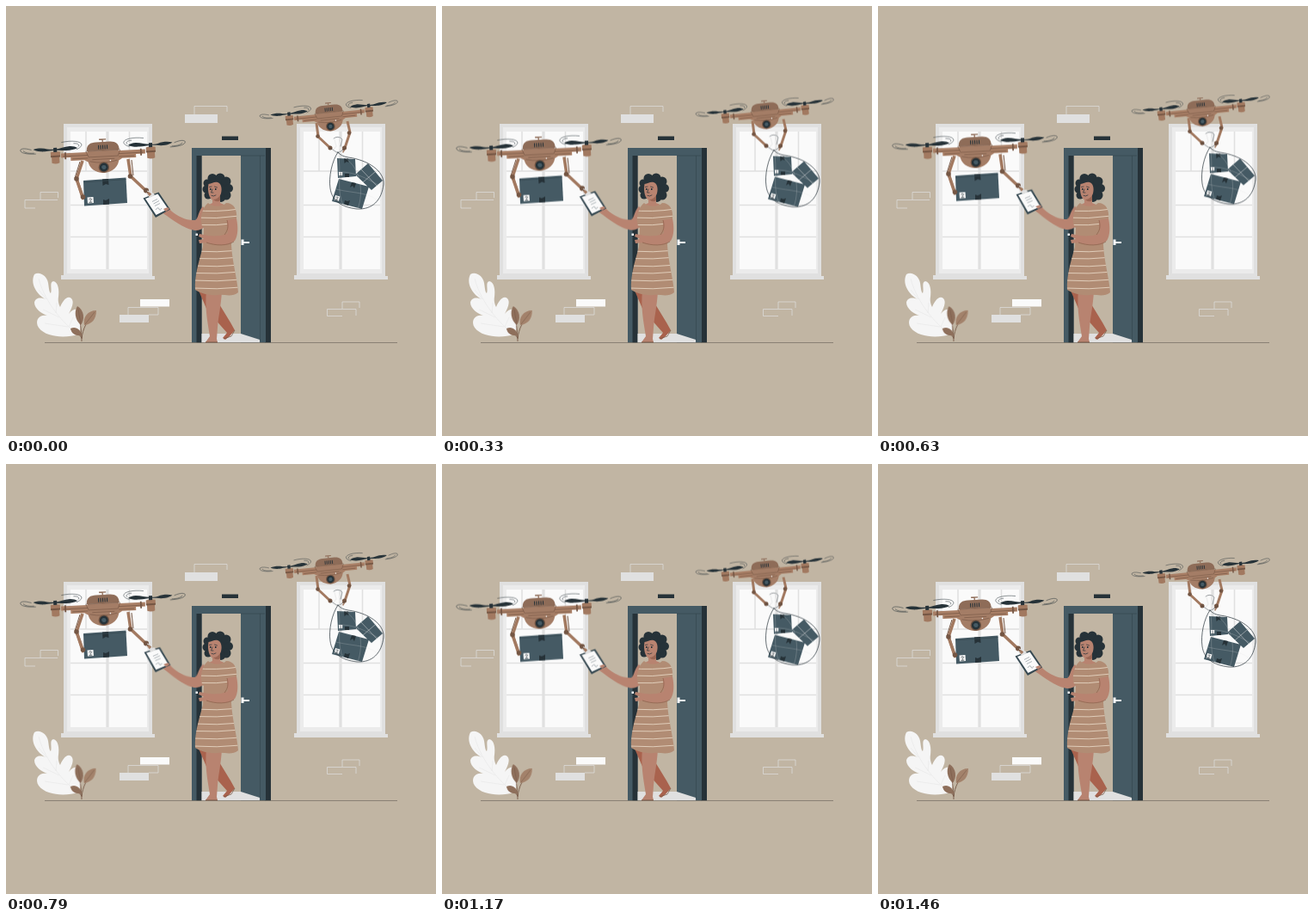
Write an HTML page that moves like this. It is 500 px wide and 500 px high and loops after 1.5 s.

```html
<!DOCTYPE html>
<html lang="en">
<head>
<meta charset="utf-8">
<title>Drone delivery</title>
<style>
html, body { margin: 0; width: 100%; height: 100%; overflow: hidden; background: #c1b5a3; }
svg { display: block; width: 100vw; height: 100vh; }
.bob, .arm, .sway { animation: bob 750ms cubic-bezier(.37, 0, .63, 1) infinite alternate; }
.arm { animation-name: lift; transform-origin: 236px 240px; }
.sway { animation-name: sway; transform-origin: 88px 390px; }
@keyframes bob { to { transform: translateY(-6px); } }
@keyframes lift { to { transform: rotate(3.5deg); } }
@keyframes sway { to { transform: rotate(-.7deg); } }
.dark { fill: #263238; }
.slate { fill: #455a64; }
.pale { fill: #e0e0e0; }
.white { fill: #fafafa; }
.skin { fill: #b88370; }
.line { fill: none; stroke: #e0e0e0; }
.ink { fill: none; stroke: #263238; stroke-linecap: round; }
.limb { fill: none; stroke: #a27960; stroke-linejoin: round; }
.shade { fill: none; stroke: #745644; }
.joint { fill: #745644; }
</style>
</head>
<body>
<svg viewBox="0 0 500 500" stroke-width=".7">
<defs>
  <g id="window">
    <path class="pale" d="M0 0H103V177H106V181H-3V176H0Z"/>
    <path fill="#ebebeb" d="M4 4H99V174H4Z"/>
    <path class="white" d="M8 9H97V169H8Z"/>
    <path d="M51 9V169" stroke="#e0e0e0" stroke-width="3.2"/>
    <path d="M26 9V55M76.500 9V55M8 55H97M8 94.500H97M8 131.500H97" stroke="#e0e0e0" stroke-width="1.5"/>
  </g>

  <g id="rotor">
    <path d="M-5.500 0Q0 -1.500 5.500 0V5H4.500V12.500Q0 14.500 -4.500 12.500V5H-5.500Z" fill="#a27960"/>
    <path class="joint" d="M-5.500 4H5.500V6H-5.500Z"/>
    <path class="dark" d="M0 -2.200C-8 -2 -12 -.8 -17 -1.500C-21 -2 -24 -3 -25.500 -4.300C-20 -5.800 -14 -5.500 -9 -4C-5 -3 -2 -3.300 0 -3.300C5 -3.400 11 -5.800 17 -6C21 -6 24 -5 26 -3.500C23 -2 18 -1 13 -1.200C8 -1.500 4 -2.200 0 -2.200Z"/>
    <path class="dark" d="M-2 -5H2V0H-2Z"/>
    <path class="ink" stroke-width=".5" d="M-23 1C-36 1 -42 -2 -40 -5C-37 -7 -31 -5 -28 -4M-37 -3C-34 0 -29 0 -25 0M8 -11C20 -13 31 -11 31 -7C31 -5 28 -3 25 -2M22 -9C28 -9 29 -6 27 -5"/>
  </g>

  <g id="drone">
    <use href="#rotor" transform="translate(-55.500 -5)"/>
    <use href="#rotor" transform="matrix(-1 0 0 1 55.500 -5)"/>
    <path d="M-49 -3H49V2H38V6H22L17 9H-17L-22 6H-38V2H-49Z" fill="#a97f66"/>
    <path class="shade" d="M-47 .5H47M-36 4H36"/>
    <path class="shade" d="M-44 -4V4M44 -4V4" stroke-width="1.8"/>
    <path d="M-19 -4C-19 -12 -14 -14 -8 -14H8C15 -14 19 -11 19 -4Z" fill="#8e6c58"/>
    <path d="M-18 -4H18V6C18 16 9 22 0 22C-9 22 -18 16 -18 6Z" fill="#a47d66"/>
    <path class="shade" d="M-20 -4H20L17 3H-17ZM-13 6H13M-16 8Q0 12 16 8" stroke-width=".6"/>
    <path class="ink" d="M-5 -10V-6M-2.500 -10V-6M0 -10V-6M2.500 -10V-6M5 -10V-6" stroke-width="1"/>
    <path d="M0 -14V-17M-4 -17H4" stroke="#8e6c58" stroke-width="1.3"/>
    <circle class="joint" cy="15.500" r="6.300"/>
    <circle class="dark" cy="15.500" r="5"/>
    <circle class="slate" cy="15.500" r="2.600"/>
    <circle class="white" cx="8" cy="8" r=".8"/>
  </g>

  <g id="label">
    <path class="white" d="M0 0H7V7H0Z"/>
    <path class="ink" d="M2 2.500L3.500 1.500L5 2.500L3.500 4V5M2 6H5"/>
  </g>
</defs>

<rect width="500" height="500" fill="#c1b5a3"/>

<path class="pale" d="M208 126H246V136H208ZM132 359H166V368H132Z"/>
<path class="white" d="M156 341H190V349.500H156Z"/>
<path class="line" d="M219 126V116.500H257V123M40 225V216.500H60.500V223M34 235H22V225.500H60M142 359V350.500H177V359H166M391 352V344H411V351M391 360.500H373.500V352.500H407V360"/>
<use href="#window" x="67" y="137"/>
<use href="#window" x="338" y="137"/>

<!-- Doorway -->
<path class="dark" d="M251 151.500H270V156H251ZM301 165H308V391.500H301Z"/>
<path class="slate" d="M216 165H302V391.500H273V174H227.500V391.500H216Z"/>
<path class="dark" d="M221.500 174H227.500V391.500H221.500Z"/>
<path class="pale" d="M227.500 381H273L295 388V391.500H227.500Z"/>
<path d="M295.500 174V389M273 174H301" fill="none" stroke="#344750"/>
<path class="white" d="M273.500 271.500H276.500V278H273.500ZM276 274H283V276H276ZM220.500 264.500H223V267H220.500Z"/>
<path d="M45 391.500H455" stroke="#716b60"/>

<!-- Plants -->
<path fill="#f5f5f5" d="M33 312C39 308 48 314 49 322C50 328 50 332 52 334C54 330 50 321 55 320C61 321 62 331 61 338C60 344 62 348 63 350C66 343 71 336 76 340C80 344 76 352 73 358C77 352 84 350 86 356C89 364 87 376 84 382C70 386 47 386 38 374C33 366 38 358 48 360C42 358 33 352 33 345C34 338 42 339 46 341C38 337 27 324 33 312Z"/>
<path d="M38 317C44 340 61 364 83 382M58 357L59 345M47 341L38 330M62 362L43 353M72 373L45 369M73 373L78 362" fill="none" stroke="#e8e8e8"/>
<g class="sway">
  <path class="shade" d="M88 390C88 381 87 372 84 356M88 387C89 375 95 365 103 356M88 386Q84 379 77 378" stroke-width=".9"/>
  <path fill="#8e6f5b" d="M83 349C79 355 80 365 87 371C92 364 91 354 83 349Z"/>
  <path fill="#a3826b" d="M105 354C95 354 89 362 91 371C100 370 105 364 105 354Z"/>
  <path fill="#8e6f5b" d="M75 375C81 372 87 376 88 383C81 384 76 381 75 375Z"/>
  <path class="shade" d="M84 353L87 370M103 356L92 370" stroke-width=".5"/>
</g>

<!-- Woman -->
<path fill="#a9624d" d="M224 331L239 332L261 368L266 377L260 384L255 388L252 386L257 380L234 354Z"/>
<path class="shade" d="M253 387L262 384L266 377"/>
<path class="skin" d="M233 331H251C250 350 247 360 246 374L245 387L246 391H232L237 384C234 365 231 350 233 331Z"/>
<path class="shade" d="M232 391H246" stroke-width="1"/>
<g class="dark">
  <ellipse cx="247" cy="211" rx="13" ry="14"/>
  <circle cx="240" cy="200.500" r="5.500"/>
  <circle cx="249" cy="200" r="5.500"/>
  <circle cx="256" cy="204" r="5.500"/>
  <circle cx="259" cy="212" r="5"/>
  <circle cx="256" cy="220" r="5.500"/>
  <circle cx="250" cy="223" r="5"/>
  <circle cx="234" cy="206" r="4.500"/>
  <circle cx="233" cy="213" r="4.500"/>
  <circle cx="235" cy="220" r="4.500"/>
</g>
<g class="arm">
  <path class="skin" d="M229 233C223 239 224 247 220 249C210 250 199 244 193 239L187 233L182 235L181 240L187 244C199 253 211 260 220 261C230 261 235 254 237 243Z"/>
  <path fill="#344750" d="M159.500 223.500L177.500 216.500L191 236.500L174 246Z"/>
  <path class="white" d="M162 224L176.500 218.500L188.500 236L174.500 243Z"/>
  <path d="M170 227.500L176 224.500M171.500 230L178 226.500M173 232.500L179 229.500M174 237Q177 233 178 236T181 235" fill="none" stroke="#8a949a"/>
  <path class="pale" d="M165 219.500L171 217L173 220L167 223Z"/>
  <path class="skin" d="M183 236L188 234L190 236L186 239Z"/>
</g>
<path class="skin" d="M240 217H249V229L256 232C250 238 241 237 236 231L240 229Z"/>
<path class="skin" d="M235.500 207C240 206 244 203 248 206C251 209 251 214 250 218C248 223 245 226 241.500 226C236 225 234 215 235.500 207Z"/>
<path d="M241 225Q246 225 249 220V226Q245 229 241 225Z" fill="#9a6654"/>
<path class="ink" d="M236.500 210.500L239 210M242.500 210L245.500 211M240 213L238.500 217H241M239 220.500Q241 222 244 220"/>
<path class="dark" d="M237 212H238.500V214H237ZM243 212H244.500V214H243Z"/>
<path fill="#b18c74" id="dress" d="M235 229C240 234 251 234 256 229C265 229 269 237 268 247C266 258 262 265 262 278C263 297 269 318 270 333C263 339 254 335 246 336C237 337 226 334 220 330C219 314 224 298 229 280L230 258C224 253 227 235 235 229Z"/>
<clipPath id="cut"><use href="#dress"/></clipPath>
<path clip-path="url(#cut)" d="M218 237.500Q245 240 271 236M218 246Q245 248 271 244M218 254.500Q245 256 271 252M218 285Q245 287 273 284M218 293.500Q245 295 273 292M218 302Q245 304 273 301M218 310.500Q245 312 273 309M218 319Q245 321 273 318M218 328Q245 330 273 327" fill="none" stroke="#e6d5c2" stroke-width=".9"/>
<path class="skin" d="M257 249L268 247C270 257 270 267 266 273C258 279 244 278 234 275L225 276L224 272L231 271L224 268L225 265L235 267C245 268 254 267 258 264Z"/>
<path d="M257 249C259 256 258 261 254 266M233 275C244 279 257 279 265 274" fill="none" stroke="#8c5d4a"/>

<!-- Left drone -->
<g class="bob">
  <path class="limb" stroke-width="3.600" d="M89 180L82 201L90 225M142 178L145 198L163 215L168 220"/>
  <path class="shade" stroke-width="1" d="M86 181L80 200M146 179L148 197"/>
  <path class="slate" d="M90 203L139.500 199.500L141 229L91 232.500Z"/>
  <path class="dark" d="M112 201.500L119 201L119.500 208L116 207L112.500 209ZM113 225L116 226L120 224V230.500L113 231Z"/>
  <path d="M90 205L139.500 201.500" stroke="#344750"/>
  <use href="#label" transform="translate(94.500 222.500) rotate(-4)"/>
  <path class="limb" stroke-width="3.200" d="M82 201L89.500 223"/>
  <circle class="joint" cx="82" cy="201" r="2.800"/>
  <circle class="joint" cx="89.500" cy="222" r="2.800"/>
  <circle class="joint" cx="144.500" cy="198" r="2.800"/>
  <circle class="joint" cx="163" cy="214.500" r="3"/>
  <path class="line" d="M164 215L169 217M163 217L166 221" stroke-width="1"/>
  <use href="#drone" transform="translate(113 172) rotate(-3)"/>
</g>

<!-- Right drone -->
<g class="bob">
  <path class="limb" stroke-width="3" d="M361 136L363 152L377 165M397 134L400 147L394 165L391 170"/>
  <circle class="joint" cx="362.500" cy="151.500" r="2.300"/>
  <circle class="joint" cx="377" cy="165" r="2.500"/>
  <circle class="joint" cx="399" cy="147.500" r="2.300"/>
  <circle class="joint" cx="393.500" cy="165" r="2.500"/>
  <path d="M382 154Q386 151 390 155L388 163L391 172M382 155L384 163L380 168L387 172L392 168" fill="none" stroke="#eeeeee" stroke-width="1.300"/>
  <path class="ink" stroke-width=".4" d="M381 154Q386 150 391 155L389 163M377 165L386 171L394 166"/>
  <path class="slate" d="M385 177L406 178L407 198L386 200ZM421 183L438 203L425 214L406 196ZM387 201L422 210L414 236L379 227Z"/>
  <path class="dark" d="M393 177.500H398L398.500 182L396 181L393.500 183ZM394 195H399V199H394ZM402 205L407 206L405 212L403 209L400 211ZM394 226L397 227L400 226L398 232L393 230Z"/>
  <path class="line" stroke-width=".5" d="M413 190L431 209M429 193L415 205"/>
  <use href="#label" transform="translate(387 193) scale(.6)"/>
  <use href="#label" transform="translate(383 220) rotate(15) scale(.8)"/>
  <path class="ink" d="M386 170C379 180 375 199 377 212C379 227 391 234 408 236C426 237 437 226 439 207C440 192 421 179 398 176C392 175 388 173 386 170Z"/>
  <path class="line" opacity=".55" stroke-width=".4" d="M386 171C391 190 383 217 393 233M388 173C414 185 416 217 409 236M378 195C400 188 422 202 438 211M377 211C397 218 419 215 432 226"/>
  <use href="#drone" transform="translate(376 127) rotate(-6) scale(.84)"/>
</g>
</svg>
</body>
</html>
```
